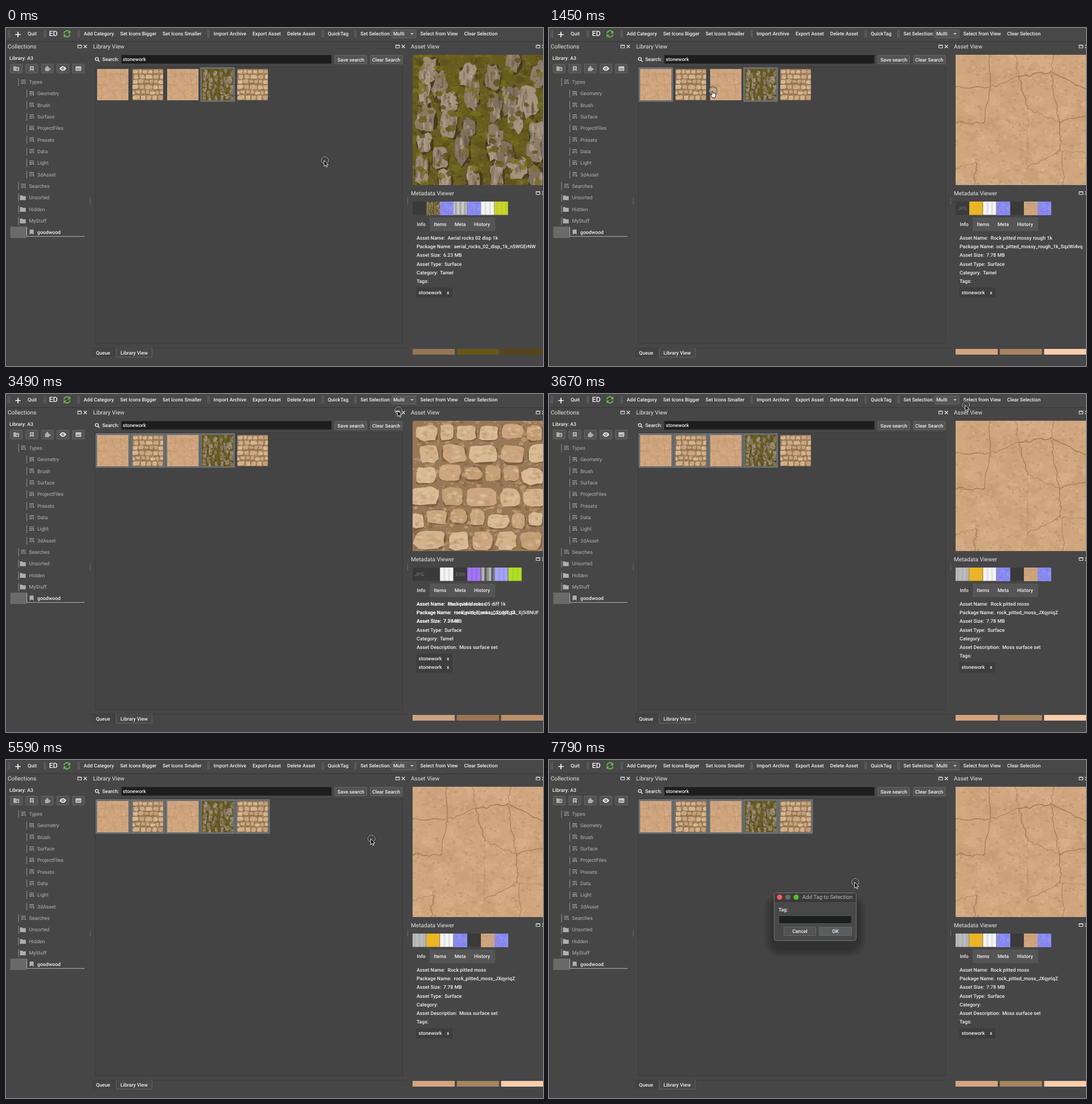
Recreate the animation shown at these times as an HTML page with a canvas. Size 943 by 594 pixels, loop 8 s.

```html
<!DOCTYPE html>
<html lang="en">
<head>
<meta charset="utf-8">
<title>Asset library</title>
<style>
html, body { margin: 0; width: 100%; height: 100%; overflow: hidden; background: #464646; }
svg, canvas { position: absolute; left: 0; top: 0; width: 943px; height: 594px; }
text { font: 500 8.7px Roboto, Arial, sans-serif; fill: #f2f2f2; text-rendering: geometricPrecision; white-space: pre; }
.title { font-size: 10.1px; font-weight: 400; fill: #e6e6e6; }
.tree { font-size: 8.8px; font-weight: 400; fill: #b4b4b4; }
.big { font-size: 12.6px; }
.dim { font-size: 9px; fill: #686868; }
.win { font-size: 9.65px; font-weight: 400; fill: #b8b8b8; }
.mid { text-anchor: middle; }
.end { text-anchor: end; }
.btn { fill: #535353; stroke: #686868; }
.ico { fill: #b0b0b0; }
.line { fill: none; stroke: #b0b0b0; }
.hide { display: none; }
</style>
</head>
<body>
<svg id="base" viewBox="0 0 943 594"></svg>
<canvas id="art" width="943" height="594"></canvas>
<svg id="top" viewBox="0 0 943 594"></svg>
<script>
const $ = id => document.getElementById(id);
const text = (x, y, s, cls = '') => `<text x="${x}" y="${y + 3}" class="${cls}">${s}</text>`;
const flow = (x, y, gap, labels) => text(x, y, labels.join(`</tspan><tspan dx="${gap}">`).replace(/^/, '<tspan>') + '</tspan>');
const rect = (x, y, w, h, fill, more = '') => `<rect x="${x}" y="${y}" width="${w}" height="${h}" fill="${fill}" ${more}/>`;
const path = (d, more) => `<path d="${d}" ${more}/>`;
const button = (x, y, w, h, more = '') => `<rect x="${x}" y="${y}" width="${w}" height="${h}" rx="1" class="btn" ${more}/>`;
const at = (x, y, s) => `<g transform="translate(${x} ${y})">${s}</g>`;

/* ---- static interface ---- */
const dots = (x, y, cols) => path(
  Array.from({ length: cols }, (_, i) => `M${x + i * 2.4} ${y}v13`).join(''),
  'stroke="#8c8c8c" stroke-width="1.1" stroke-dasharray="1.1 1.1"');
const panel = (x, y, label, iconX) => text(x, y + .2, label, 'title') + at(iconX, y - .5,
  path('M0 -2.5h6.5v5h-6.5zM0 -1.7h6.5', 'fill="none" stroke="#dcdcdc" stroke-width="1.1"') +
  path('M10.5 -2.7l5.4 5.4m0 -5.4l-5.4 5.4', 'stroke="#dcdcdc" stroke-width="1.4"'));

const listIcon = path('M0 -3.5h8M0 -.7h8M0 2.1h4.5', 'class="line" stroke-width="1.1"') +
  path('M5.5 1.2h3.4l-1.7 2.4z', 'class="ico"');
const folder = path('M0 -4h4l1 1.3h5.2v7H0z', 'class="ico"');
const bookmark = path('M0 -4.3h7v9l-3.5 -2.2l-3.5 2.2z', 'class="ico"');
const toolIcons = [
  at(-5, 0, folder) + path('M0 1.2h4M2 -.8v4', 'stroke="#555"'),
  at(-3.5, 0, bookmark) + path('M-1.6 -1h3.2M0 -2.6v3.2', 'stroke="#555"'),
  rect(-4, -2, 7, 6.5, '#b0b0b0') + '<g class="ico"><circle cy="-3" r="1.7"/><circle cx="4" cy="1" r="1.7"/></g>',
  path('M-6 0q6 -8 12 0q-6 8 -12 0z', 'fill="#eee"') + '<circle r="2.3" fill="#555"/><circle r="1.1" fill="#eee"/>',
  rect(-5, -4, 10, 8, '#c8c8c8', 'rx="1"') + path('M-3.2 1h1.6M-.8 1h1.6M1.6 1h1.6', 'stroke="#444" stroke-width="1.5"')
];
const types = ['Geometry', 'Brush', 'Surface', 'ProjectFiles', 'Presets', 'Data', 'Light', '3dAsset'];
const shelves = ['Unsorted', 'Hidden', 'MyStuff'];

function toolbar() {
  const arc = path('M-5.3 -1a5.4 5.4 0 0 1 9.3 -2.7', 'fill="none" stroke="#68b84a" stroke-width="1.9"') +
    path('M6 -6.2v5.3h-5.2z', 'fill="#68b84a"');
  const group = (x, ...labels) => dots(x, 4, 2) + flow(x + 10, 10, 11, labels);
  return rect(0, 0, 943, 24, '#484848') + rect(0, 23.5, 943, 1, '#343434') +
    dots(4, 4, 2) + path('M16.3 11.5h9.4M21 6.8v9.4', 'stroke="#fff" stroke-width="1.7"') + text(38, 10, 'Quit') +
    dots(67, 4, 2) + text(75.5, 11.2, 'ED', 'big') +
    at(107, 10.3, arc + `<g transform="rotate(180)">${arc}</g>`) +
    group(126.5, 'Add Category', 'Set Icons Bigger', 'Set Icons Smaller') +
    group(354.5, 'Import Archive', 'Export Asset', 'Delete Asset') +
    group(555, 'QuickTag') + group(612.5, 'Set Selection:') +
    button(677.5, 3.5, 42.5, 14) + text(680, 10, 'Multi') + path('M710 9h6l-3 3z', 'fill="#ccc"') +
    text(804.5, 10, 'Clear Selection');
}

function sidebar() {
  let s = panel(3, 33, 'Collections', 126) + text(6, 52.5, 'Library: A3');
  toolIcons.forEach((icon, i) => {
    const x = 7.5 + i * 27.3;
    s += button(x, 63.5, 21, 15.5) + at(x + 10.5, 71.3, icon);
  });
  ['Types', ...types, 'Searches', ...shelves].forEach((label, i) => {
    const x = types.includes(label) ? 55 : 40.5, y = 95 + i * 20.33;
    s += path(`M${x - 18.5} ${y - 7}v14`, 'stroke="#8e8e8e" stroke-width="1.1"') + text(x, y, label, 'tree') +
      (shelves.includes(label) ? at(x - 16, y, folder) : at(x - 14, y, listIcon));
  });
  return s + rect(7.5, 349, 29, 20, '#6a6a6a') + path('M36.5 350v16.3H138', 'fill="none" stroke="#b2b2b2"') +
    at(41.5, 358.6, bookmark) + text(55, 358.6, 'goodwood') + dots(148, 298, 1);
}

function library() {
  return panel(153, 33, 'Library View', 684.5) +
    '<circle cx="159.5" cy="54.5" r="2.6" fill="none" stroke="#e6e6e6" stroke-width="1.4"/>' +
    path('M161.5 56.5l2.8 2.8', 'stroke="#e6e6e6" stroke-width="1.6"') + text(169, 55.3, 'Search:') +
    rect(202.5, 47.5, 369, 15, '#1d1d1d', 'stroke="#333"') + text(205, 55.3, 'stonework') +
    button(577.5, 48, 56, 15) + text(582, 55.5, 'Save search') +
    button(640, 48, 56, 15) + text(643, 55.5, 'Clear Search') +
    rect(156.5, 68.5, 540, 486.5, '#444', 'stroke="#3a3a3a"') +
    path('M150 562.5H702', 'stroke="#3c3c3c"') + rect(151, 563, 42, 15.5, '#424242') +
    path('M193.5 561.5V578.5H256.5V561.5', 'fill="#484848" stroke="#636363"') +
    text(158, 571, 'Queue') + text(201, 571.3, 'Library View');
}

$('base').innerHTML = rect(0, 0, 943, 594, '#464646') + rect(0, 24, 1, 570, '#3a3a3a') +
  toolbar() + sidebar() + library() + dots(705.5, 298, 1) +
  panel(711, 33, 'Asset View', 931) + panel(711, 290.5, 'Metadata Viewer', 931) +
  rect(744, 333, 115, 24, '#555') + flow(721.5, 345, 14.4, ['Info', 'Items', 'Meta', 'History']);

/* ---- textures ---- */
function seeded(n) {
  return () => {
    n = n + 0x6D2B79F5 | 0;
    let t = Math.imul(n ^ n >>> 15, 1 | n);
    t = t + Math.imul(t ^ t >>> 7, 61 | t) ^ t;
    return ((t ^ t >>> 14) >>> 0) / 4294967296;
  };
}
const SIZE = 229;
function texture(seed, fill, draw) {
  const cv = document.createElement('canvas');
  cv.width = cv.height = SIZE;
  const c = cv.getContext('2d'), rnd = seeded(seed);
  c.fillStyle = fill;
  c.fillRect(0, 0, SIZE, SIZE);
  const pick = list => list[rnd() * list.length | 0];
  const jitter = n => (rnd() - .5) * 2 * n;
  // power 1 gives an ellipse, lower values a rounded box
  const blob = (x, y, w, h, color, alpha = 1, power = 1, rough = .4) => {
    const f = v => Math.sign(v) * Math.abs(v) ** power;
    c.fillStyle = color;
    c.globalAlpha = alpha;
    c.beginPath();
    for (let a = 0; a < 6.28; a += .42) {
      const k = (1 - rough * rnd()) / 2;
      c.lineTo(x + f(Math.cos(a)) * w * k, y + f(Math.sin(a)) * h * k);
    }
    c.fill();
    c.globalAlpha = 1;
  };
  const scatter = (n, min, max, colors, alpha, tall = .75) => {
    while (n--) {
      const w = min + (max - min) * rnd();
      blob(rnd() * SIZE, rnd() * SIZE, w, w * tall, pick(colors), alpha);
    }
  };
  draw({ c, rnd, pick, jitter, blob, scatter });
  return cv;
}

const rock = texture(7, '#d0a67f', ({ c, rnd, jitter, scatter }) => {
  scatter(160, 12, 40, ['#dcb48e', '#c49871', '#d9b089', '#c89e79'], .35);
  scatter(700, 2, 9, ['#e0ba94', '#b58c68', '#c39a75'], .4);
  const pitch = 68, node = Array.from({ length: 25 }, (_, i) =>
    [i % 5 * pitch - 22 + jitter(20), (i / 5 | 0) * pitch - 22 + jitter(20)]);
  const crack = (a, b) => {
    c.beginPath();
    for (let k = 0; k <= 1; k += .1)
      c.lineTo(a[0] + (b[0] - a[0]) * k + jitter(2.5), a[1] + (b[1] - a[1]) * k + jitter(2.5));
    c.strokeStyle = '#8a684a';
    c.lineWidth = .8 + rnd();
    c.globalAlpha = .35 + rnd() * .35;
    c.stroke();
  };
  node.forEach((p, i) => {
    if (i % 5 < 4 && rnd() < .85) crack(p, node[i + 1]);
    if (i < 20 && rnd() < .75) crack(p, node[i + 5]);
  });
  scatter(180, 1, 4, ['#a3978a', '#94897a'], .6);
});

const wall = texture(21, '#987856', ({ rnd, pick, jitter, blob, scatter }) => {
  scatter(500, 3, 13, ['#80623f', '#a88660', '#b8956d', '#c9a67c'], .65);
  const rows = 6, pitch = SIZE / rows;
  for (let r = 0; r < rows; r++) {
    const big = r % 2, width = big ? 50 : 36;
    for (let x = jitter(14); x < SIZE + 20;) {
      const w = width * (.75 + rnd() * .5), h = pitch * (big ? .93 : .65 + rnd() * .25);
      const cx = x + w / 2, cy = (r + .5) * pitch + jitter(big ? 2 : 5);
      blob(cx + .7, cy + 1.5, w - 1, h + 1, '#775839', .8, .6, .2);
      blob(cx, cy, w - 2, h, pick(['#d4b38c', '#cba680', '#d8ba95', '#c49f76']), 1, .6, .2);
      for (let i = 0; i < 14; i++)
        blob(cx + jitter(w * .33), cy + jitter(h * .33), w * .25, h * .2, pick(['#e4cba8', '#b8946b', '#cda983']), .4);
      x += w;
    }
  }
  scatter(350, 1, 4, ['#dfc5a2', '#94734f'], .4);
});

const moss = texture(33, '#665d1f', ({ rnd, pick, jitter, blob, scatter }) => {
  scatter(260, 6, 24, ['#76701f', '#585018', '#6f6420', '#614f22'], .6);
  for (let i = 0; i < 30; i++) {
    const x = (i % 6 + .5) * 39 + jitter(12), y = ((i / 6 | 0) + .5 + i % 2 * .4) * 46 + jitter(14);
    const w = 34 + jitter(8), h = 56 + jitter(14);
    blob(x + 1, y + 3, w + 3, h, '#43381f', .9, .8);
    blob(x, y, w, h, pick(['#8d7c69', '#9c8b77', '#80705f', '#a49480']), 1, .8);
    for (let k = 0; k < 12; k++)
      blob(x + jitter(w * .33), y + jitter(h * .25), 3 + rnd() * 4, h * .35, pick(['#b7a791', '#655546', '#83725f', '#978572']), .6);
  }
  scatter(170, 4, 20, ['#77711f', '#665e1a', '#584c18'], .75);
  scatter(900, 1, 5, ['#89832a', '#4c421b', '#726a22', '#8d7e69'], .55);
});

const normal = texture(5, '#8688ee', ({ scatter }) =>
  scatter(150, 15, 50, ['#7c9af4', '#9f88ee', '#8a7be6', '#8fa0f6'], .6));

/* ---- scenes ---- */
const DARK = '#3a3a3a', WHITE = ['#e4e4e6', '#f6f6f6'], GOLD = '#eab527';
const rough = { tex: rock, strip: ['JPG', GOLD, WHITE, normal, DARK, rock, normal], pal: ['#d3a67f', '#a68562', '#facdab'] };
const looks = {
  rough,
  pitted: { ...rough, strip: [['#bdbdbd', '#b2b2b2'], ...rough.strip.slice(1)] },
  moss: { tex: moss, strip: [DARK, moss, normal, ['#c9c9c9', '#aaa'], normal, WHITE, ['#cdd623', '#c2cf31']],
    pal: ['#937657', '#665816', '#56451a'] },
  wall: { tex: wall, strip: ['JPG', DARK, WHITE, 'EXR', ['#9a6cee', '#a578f2'], ['#8e8e8e', '#606060', '#b4b4b4'],
    ['#9b9bf5', '#a5a7f7'], ['#a3da1e', '#b8de26']], pal: ['#c9a484', '#997756', '#bb9069'] }
};
const AERIAL = ['Aerial rocks 02 disp 1k', 'aerial_rocks_02_disp_1k_n5WGErNW', '6.23 MB'];
const ROUGH = ['Rock pitted mossy rough 1k', 'rock_pitted_mossy_rough_1k_SqzWi4vq', '7.78 MB'];
const BLOCKS = ['Medieval blocks 05 diff 1k', 'medieval_blocks_05_diff_1k_Xj5i8NUF', '7.3 MB'];
const PITTED = ['Rock pitted moss', 'rock_pitted_moss_JXqyriqZ', '7.78 MB'];
// picked: how many thumbnails of `order` are selected
const order = [3, 0, 1, 2, 4];
const scenes = [
  { t: 0, look: 'moss', picked: 1, info: [AERIAL] },
  { t: 1270, look: 'rough', picked: 2, info: [ROUGH] },
  { t: 2750, look: 'rough', picked: 3, info: [ROUGH, BLOCKS] },
  { t: 2930, look: 'wall', picked: 3, info: [BLOCKS] },
  { t: 3490, look: 'wall', picked: 4, info: [BLOCKS, PITTED] },
  { t: 3670, look: 'pitted', picked: 4, info: [PITTED] },
  { t: 4200, look: 'pitted', picked: 5, info: [PITTED] }
];

const art = $('art').getContext('2d');
art.imageSmoothingQuality = 'high';
function drawArt({ look, picked }) {
  const { tex, strip, pal } = looks[look];
  const box = (x, y, w, h, color) => { art.fillStyle = color; art.fillRect(x, y, w, h); };
  art.clearRect(0, 0, 943, 594);
  [rock, wall, rock, moss, wall].forEach((img, i) => {
    const x = 160.3 + i * 61.35;
    if (order.indexOf(i) < picked) {
      box(x - 3, 69, 60.5, 60.5, '#72777b');
      box(x - 1, 71, 56.5, 56.5, '#5d6164');
    }
    art.drawImage(img, x, 72, 54.6, 54.6);
  });
  art.drawImage(tex, 714, 47);
  strip.forEach((cell, i) => {
    const x = 714 + i * 24;
    if (cell instanceof HTMLCanvasElement) art.drawImage(cell, x, 305, 23.5, 23.5);
    else if (Array.isArray(cell)) {
      for (let k = 0; k < 12; k++) box(x + k * 2, 305, k < 11 ? 2 : 1.5, 23.5, cell[(k * 5 + (k >> 1)) % cell.length]);
    } else box(x, 305, 23.5, 23.5, cell[0] === '#' ? cell : DARK);
  });
  pal.forEach((color, i) => box(714 + i * 77.7, 564, 74, 10, color));
}

function infoText({ look, info }) {
  const moved = info.includes(PITTED), clean = info.length < 2;
  const y = i => 369 + i * 15.2;
  let s = '';
  const field = (i, label, x, value) => s += text(721, y(i), label) + text(x, y(i), value);
  info.forEach(([name, pack, size]) => {
    field(0, 'Asset Name:', 775.5, name);
    // the longest name is scrolled to its end
    const value = pack === ROUGH[1] ? text(937, y(1), pack, 'end') : text(786.5, y(1), pack);
    s += text(721, y(1), 'Package Name:') + `<g clip-path="url(#pack)">${value}</g>`;
    field(2, 'Asset Size:', 768, size);
  });
  field(3, 'Asset Type:', 770, 'Surface');
  field(4, 'Category:', 762, moved && clean ? '' : 'Tamel');
  if (moved) field(5, 'Asset Description:', 796, 'Moss surface set');
  if (clean || !moved) s += text(721, y(moved ? 6 : 5), 'Tags:');
  const tags = [464.5, 480].filter((_, i) => i ? moved : !moved || !clean);
  tags.forEach(ty => s += rect(720.5, ty - 8.5, 63.5, 18, '#3d3d3d'));
  tags.forEach(ty => s += text(724.5, ty, 'stonework') + text(774, ty, 'x'));
  looks[look].strip.forEach((cell, i) => {
    if (/^[A-Z]/.test(cell)) s += text(726 + i * 24, 317, cell, 'dim mid');
  });
  return s;
}

/* ---- overlay ---- */
function dialog() {
  let s = '';
  for (let i = 0; i < 4; i++)
    s += rect(379 + i * 4, 234 + i * 3, 177 - i * 8, 112 - i * 7, '#000', `rx="${28 - i * 4}" opacity=".08"`);
  s += rect(395.5, 233.5, 144, 84, '#484848', 'rx="4" stroke="#747474"') +
    path('M396 248.5V237q0-3 3-3H536q3 0 3 3V248.5z', 'fill="#3b3b3b"') + rect(396, 248, 143, 1, '#2c2c2c');
  ['#fc5b57', '#6b6b6b', '#53c22b'].forEach((color, i) =>
    s += `<circle cx="${405 + i * 14.5}" cy="241" r="4.6" fill="${color}"/>`);
  return s + text(445, 241.3, 'Add Tag to Selection', 'win') + text(403, 262.5, 'Tag:') +
    rect(403.5, 273.5, 128, 14, '#1f1f1f', 'stroke="#4d5a66"') +
    button(412.5, 293.5, 56, 15) + button(474.5, 293.5, 57, 15, 'style="fill:#5b5e61"') +
    text(440.5, 301, 'Cancel', 'mid') + text(503, 301, 'OK', 'mid');
}
$('top').innerHTML = '<clipPath id="pack"><rect x="785.5" y="376" width="152" height="16"/></clipPath><g id="info"></g>' +
  button(723.5, 2.5, 74.5, 15.5, 'id="hover"') + text(727.5, 10, 'Select from View') +
  `<g id="dialog">${dialog()}</g><g id="cursor"><g fill="none">` +
  '<circle r="6.7" stroke="#111" stroke-width="2.2" opacity=".7"/><circle r="6.5" stroke="#d8d8d8" stroke-width=".9"/></g>' +
  path('M-1.4 .3v10.2l2.4 -2.2l1.7 3.6l1.6 -.8l-1.7 -3.4h3.3z', 'id="arrow" stroke="#fff" stroke-width=".9"') +
  path('M-2 1.2q1.2 -1 1.8 .3v3q3.8 -.6 5 1.2v4l-1.3 3h-4.5l-2.9 -4.4q-.4 -1.6 1 -1.2l.9 .8z',
    'id="hand" fill="#fff" stroke="#111" stroke-width=".9"') + '</g>';

/* ---- motion ---- */
const TICK = 181; // the cursor is redrawn at this pace
const stops = [[0, 560, 232.5], [1080, 189, 98], [1440, 288, 110], [2700, 301, 110], [3430, 689, 29], [3800, 772, 10],
  [4500, 772, 10], [5060, 687, 49], [5900, 577, 266], [6690, 587, 14.5], [7400, 579, 26], [7780, 538, 214.5]];

function cursorAt(t) {
  const next = stops.findIndex(s => s[0] > t);
  if (next < 0) return stops[stops.length - 1].slice(1);
  const [t0, x0, y0] = stops[next - 1], [t1, x1, y1] = stops[next];
  const k = (t - t0) / (t1 - t0), ease = k * k * (3 - 2 * k);
  return [x0 + (x1 - x0) * ease, y0 + (y1 - y0) * ease];
}
const show = (id, on) => $(id).classList.toggle('hide', !on);

let shown;
function render(t) {
  const scene = scenes.filter(s => s.t <= t).pop();
  if (scene !== shown) {
    shown = scene;
    drawArt(scene);
    $('info').innerHTML = infoText(scene);
  }
  const [x, y] = cursorAt(Math.floor(t / TICK) * TICK);
  const hand = x > 160 && x < 462 && y > 71 && y < 127;
  $('cursor').setAttribute('transform', `translate(${x} ${y})`);
  show('arrow', !hand);
  show('hand', hand);
  show('hover', t >= 3870 && t < 4560);
  show('dialog', t >= 7270);
}

const start = performance.now();
function loop() {
  render((performance.now() - start) % 8000);
  requestAnimationFrame(loop);
}
loop();
</script>
</body>
</html>
```
